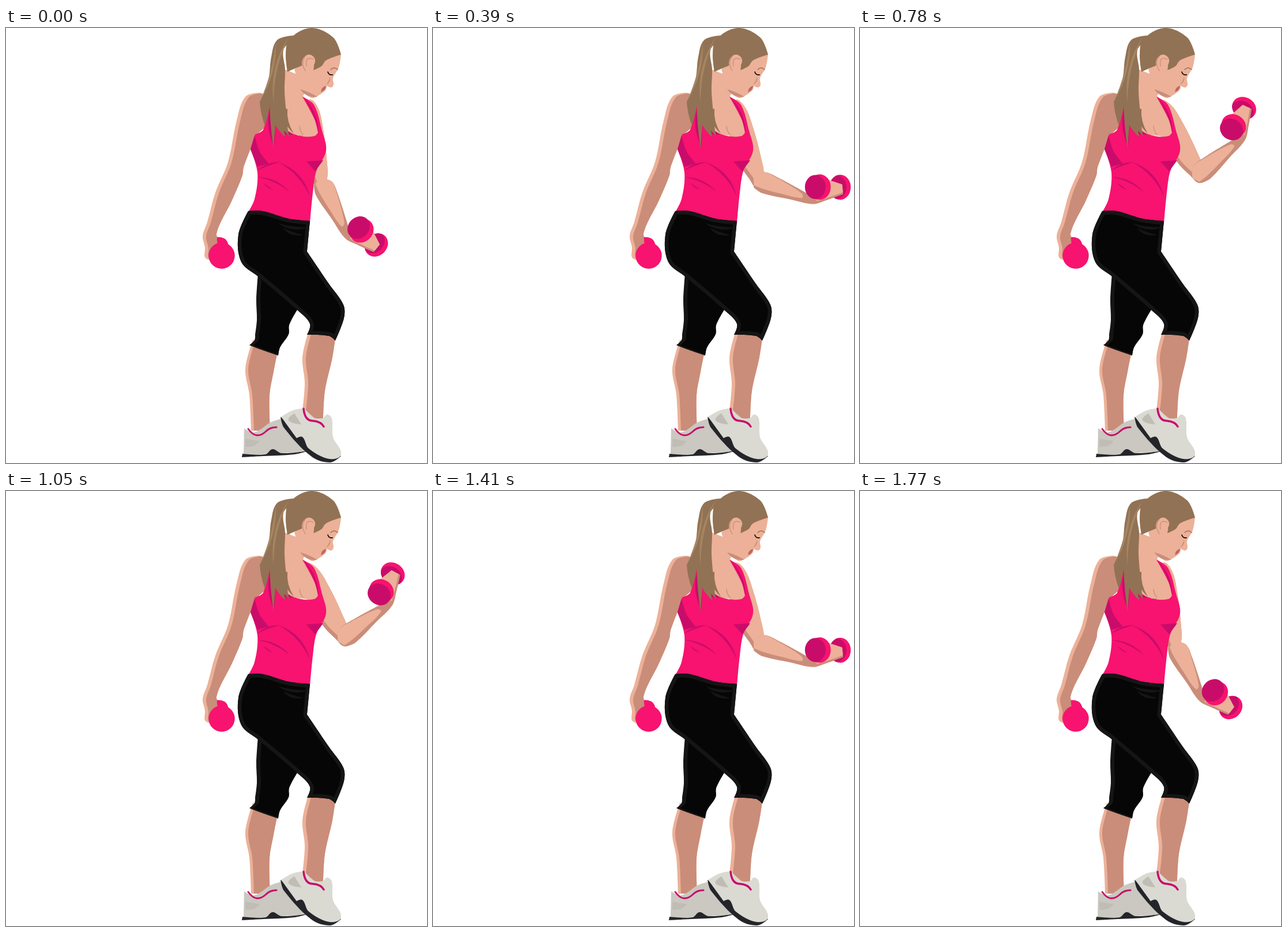
An HTML page with a canvas that plays this animation: 730x753 px, repeating every 1800 ms.

```html
<!DOCTYPE html>
<html lang="en">
<head>
<meta charset="utf-8">
<title>Dumbbell curl</title>
<style>
html, body { margin: 0; width: 100%; height: 100%; overflow: hidden; background: #fff; }
canvas { display: block; }
</style>
</head>
<body>
<canvas id="stage" width="730" height="753"></canvas>
<script>
const ctx = document.getElementById('stage').getContext('2d');
const LOOP = 1800, STEP = 30, RAD = Math.PI / 180;
const SKIN = '#ecb198', SHADE = '#ca8d79', PINK = '#f7136f', PLUM = '#c90c6a';
const HAIR = '#927254', GLOW = '#a58662', BLACK = '#060607', SHEEN = '#151515';
const SHOE = '#dadad2', SHOE2 = '#cac8c0', SOLE = '#24252a', PATCH = '#bfbdb5';

// Smooth closed curve through "x,y" key points; "!" marks a corner.
function outline(text) {
  const pts = text.split(' ').map(s => {
    const [x, y] = s.replace('!', '').split(',').map(Number);
    return { x, y, corner: s.endsWith('!') };
  });
  const n = pts.length, at = i => pts[(i + n) % n];
  const tangent = i => {
    if (at(i).corner) return [0, 0];
    const a = at(i - 1), b = at(i + 1), len = Math.hypot(b.x - a.x, b.y - a.y);
    return [(b.x - a.x) / len, (b.y - a.y) / len];
  };
  const path = new Path2D();
  path.moveTo(pts[0].x, pts[0].y);
  for (let i = 0; i < n; i++) {
    const a = at(i), b = at(i + 1), k = Math.hypot(b.x - a.x, b.y - a.y) / 3;
    const [sx, sy] = tangent(i), [ex, ey] = tangent(i + 1);
    path.bezierCurveTo(a.x + sx * k, a.y + sy * k, b.x - ex * k, b.y - ey * k, b.x, b.y);
  }
  return path;
}

function fill(color, path) {
  ctx.fillStyle = color;
  ctx.fill(path);
}

function inside(path, paint) {
  ctx.save();
  ctx.clip(path);
  paint();
  ctx.restore();
}

// Two-tone shape: the top colour is the same outline moved by dx, dy.
function rim(path, base, top, dx, dy) {
  fill(base, path);
  inside(path, () => {
    ctx.translate(dx, dy);
    fill(top, path);
  });
}

// Sliver between two arcs that share both ends; a and b are their bulges.
function sliver(color, x1, y1, x2, y2, a, b) {
  const dx = x2 - x1, dy = y2 - y1, len = Math.hypot(dx, dy);
  const ctrl = h => [(x1 + x2) / 2 + 2 * h * dy / len, (y1 + y2) / 2 - 2 * h * dx / len];
  ctx.fillStyle = color;
  ctx.beginPath();
  ctx.moveTo(x1, y1);
  ctx.quadraticCurveTo(...ctrl(a), x2, y2);
  ctx.quadraticCurveTo(...ctrl(b), x1, y1);
  ctx.fill();
}

// Hair tip narrowing from a root of width w.
function lock(x, y, w, tipX, tipY) {
  ctx.fillStyle = HAIR;
  ctx.beginPath();
  ctx.moveTo(x, y);
  ctx.quadraticCurveTo(x + 1, (y + tipY) / 2, tipX, tipY);
  ctx.quadraticCurveTo(x + w - 2, (y + tipY) / 2, x + w, y);
  ctx.fill();
}

function oval(color, x, y, rx, ry = rx) {
  const path = new Path2D();
  path.ellipse(x, y, rx, ry, 0, 0, 2 * Math.PI);
  fill(color, path);
  return path;
}

function curve(color, width, d) {
  ctx.strokeStyle = color;
  ctx.lineWidth = width;
  ctx.stroke(new Path2D(d));
}

const body = {
  backCalf: outline('428,540! 415,590 422,635 425,697! 458,697! 457,635 464,595 471,560!'),
  frontCalf: outline('525,524! 514,570 518,615 514,662! 530,676! 550,676! 553,628 566,570 572,530!'),
  backThigh: outline('437,425! 434,470 435,505 432,531! 431,540 422,549! 440,556 472,567! 475,553 490,530 491,514 506,486!'),
  frontThigh: outline('420,317! 445,317 490,330 527,334! 522,387! 560,443 585,479 586,502 571,541! 560,533 522,531! 527,512 505,488 437,430 408,405 403,358'),
  arm: outline('440,112! 415,119 400,160 385,232 363,285 349,336 341,360 345,380 345,397 354,402! 374,371! 365,356 392,298 410,255 412,241 434,185! 457,165! 461,120!'),
  chest: outline('484,72! 478,140 482,182! 540,190! 533,140 515,118! 530,90!'),
  shirt: outline('456,134! 446,176 432,184! 424,210! 436,250 431,296 418,322! 527,338! 532,285 538,248 555,212 548,178 534,133 514,119! 535,158 541,181! 535,187 511,187 480,173 463,134!'),
  side: outline('431,186! 424,210! 436,240! 456,235! 440,214'),
  bust: outline('521,231! 550,229! 536,248!'),
  face: outline('530,40! 581,46! 577,68 567,87 568,98 564,103 556,100! 555,106 549,112 540,118! 530,121 512,108! 500,72!'),
  cap: outline('488,76! 485,46 491,20 528,0 567,16 581,46! 555,56 547,66 533,73! 532,60 511,66'),
  ear: outline('515,53 526,46 536,55 530,70 521,76 514,67'),
  tail: outline('498,13! 470,21 460,50 455,90 440,128! 458,134! 462,160! 488,165! 483,110 484,72 481,38 495,23!')
};

const shoes = {
  back: outline('413,693! 430,700 460,682 480,676! 528,733! 412,740!'),
  backPatch: outline('415,711! 440,715! 431,723 415,725!'),
  backSole: outline('410,737! 450,738 462,729 478,736 524,732! 500,738 445,741 409,743!'),
  front: outline('477,673! 497,662 517,658! 535,675 551,675! 557,669 565,676 567,708 581,738 561,746 525,728 514,708 504,710!'),
  frontPatch: outline('490,679 500,667! 512,686!'),
  frontSole: outline('476,673! 482,692 530,742 562,752 581,741! 540,720!')
};

const curl = {
  upper: outline('0,-16 14,0 18,40 17,90 13,124 -2,143 -13,122 -22,90 -22,10'),
  lower: outline('-7,-8! 10,-18 33,-10 84,16! 112,8! 124,25! 98,35 57,28 8,18.5 -7,9!'),
  light: outline('-8,-8! 10,-18 32,-9 76,17 77,25 40,18.5 9,11 -7,5!'),
  hand: outline('104,10! 120,-8! 146,0! 148,17! 122,27 98,35!')
};

function curlArm(lift) {
  const swing = (7.8 + 20.5 * lift) * RAD, bend = (45 - 109 * lift) * RAD;
  ctx.save();
  ctx.translate(527, 140);
  ctx.rotate(-swing);
  rim(curl.upper, SHADE, SKIN, 6, -3);
  ctx.translate(0, 132.5);
  ctx.rotate(swing + bend);
  fill(SHADE, curl.lower);
  fill(SKIN, curl.light);
  inside(oval(PINK, 142.5, 5, 18.5, 21.7), () => oval(PLUM, 136, 5, 17.5, 20.5));
  rim(curl.hand, SHADE, SKIN, 4, -5);
  oval(PINK, 107, 5.5, 19.3, 22);
  oval(PLUM, 99.5, 5.5, 18, 20.8);
  ctx.restore();
}

function drawLegs() {
  rim(body.backCalf, SKIN, SHADE, 5, 0);
  rim(body.frontCalf, SKIN, SHADE, 6, 0);
  fill(SHOE2, shoes.back);
  fill(PATCH, shoes.backPatch);
  fill(SOLE, shoes.backSole);
  curve(PLUM, 3, 'M420 694Q434 714 451 698Q458 691 469 691');
  fill(SOLE, shoes.frontSole);
  fill(SHOE, shoes.front);
  fill(PATCH, shoes.frontPatch);
  curve(PLUM, 3.5, 'M516 659Q518 680 532 680Q546 681 551 690');
}

function drawPants() {
  rim(body.backThigh, SHEEN, BLACK, 7, 0);
  fill(BLACK, body.frontThigh);
  inside(body.frontThigh, () => {
    ctx.strokeStyle = SHEEN;
    ctx.lineWidth = 13;
    ctx.stroke(body.frontThigh);
  });
  sliver(SHEEN, 472, 338, 524, 345, -2, -7);
  sliver(SHEEN, 480, 346, 515, 358, -1, -6);
}

function drawTorso() {
  rim(body.arm, SKIN, SHADE, 6, 1);
  sliver(PINK, 366, 362, 386, 380, 7, -9);
  oval(PINK, 374, 394, 22.7);
  fill(SKIN, body.chest);
  curve(SHADE, 1.3, 'M509 170Q510 180 515 184');
  fill(PINK, body.shirt);
  fill(PLUM, body.side);
  fill(PLUM, body.bust);
  sliver(PLUM, 515, 119, 542, 182, 4, 7);
  sliver(PLUM, 459, 135, 465, 205, -7, 4);
  sliver(PLUM, 468, 165, 498, 184, 0, -8);
  sliver(PLUM, 435, 247, 475, 232, 1, 4);
  sliver(PLUM, 436, 258, 492, 284, 4, 7);
  sliver(PLUM, 446, 268, 463, 280, 0, -2);
  sliver(PLUM, 472, 232, 527, 292, 7, 11);
}

function drawHead() {
  fill(SKIN, body.face);
  sliver(SHADE, 510, 106, 540, 119, 1, -5);
  sliver(SHADE, 562, 84, 555, 98, 1, 3);
  sliver('#c2675c', 555, 100, 546, 111, -2.5, 2.5);
  curve('#17110e', 1.8, 'M558 76Q560 82 566 81');
  curve('#9a7455', 1.4, 'M563 72Q569 66 575 72');
  fill(HAIR, body.cap);
  fill(SKIN, body.ear);
  curve(SHADE, 1.3, 'M519 74Q510 60 519 49M533 54Q518 48 521 66');
  fill(HAIR, body.tail);
  lock(440, 127, 18, 449, 169);
  lock(457, 130, 12, 464, 209);
  lock(462, 150, 20, 484, 189);
  lock(470, 150, 18, 491, 187);
  lock(476, 140, 12, 499, 183);
  sliver(GLOW, 468, 24, 441, 126, 4, 8);
  sliver(GLOW, 490, 16, 464, 130, -11, -7);
}

function render(ms) {
  const t = Math.floor((ms % LOOP) / STEP) * STEP;
  const x = 1 - Math.abs(2 * t / LOOP - 1);
  ctx.fillStyle = '#fff';
  ctx.fillRect(0, 0, 730, 753);
  curlArm(x * x * (3 - 2 * x));
  drawLegs();
  drawTorso();
  drawPants();
  drawHead();
}

ctx.lineCap = ctx.lineJoin = 'round';
const start = performance.now();
function tick() {
  render(performance.now() - start);
  requestAnimationFrame(tick);
}
tick();
</script>
</body>
</html>
```
